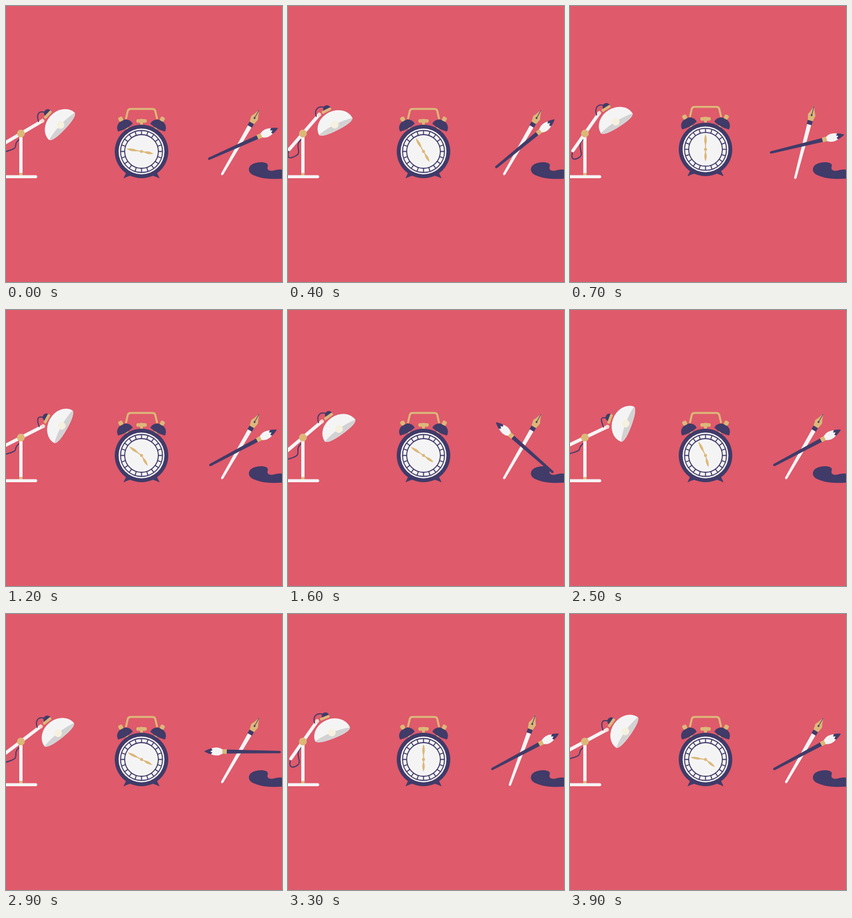
These frames come from a looping animation (500 by 500 pixels, 4 s). An HTML page:

```html
<!DOCTYPE html>
<html lang="en">
<head>
<meta charset="utf-8">
<title>Desk tools</title>
<style>
  html, body { margin: 0; width: 100%; height: 100%; overflow: hidden; background: #df5a6b; }
  svg { display: block; width: 100vw; height: 100vh; }
  .navy { fill: #403b69; }
  .gold { fill: #dbb878; }
  .white { fill: #f5f4f5; }
  .line { fill: none; stroke-linecap: round; stroke-linejoin: round; }
</style>
</head>
<body>
<svg viewBox="0 0 500 500">
  <rect width="500" height="500" fill="#df5a6b"/>

  <g id="lamp">
    <path id="lowCord" class="line" stroke="#403b69" stroke-width="2"/>
    <rect class="white" x="24" y="231" width="6" height="77"/>
    <rect class="gold" x="24" y="302.5" width="6" height="4.5"/>
    <rect class="white" x="-10" y="306.5" width="66.5" height="5.5" rx="2.75"/>
    <path id="arm" class="line" stroke="#f5f4f5" stroke-width="6"/>
    <circle class="gold" cx="27" cy="231" r="7"/>
    <path id="topCord" class="line" stroke="#403b69" stroke-width="2"/>
    <!-- x runs along the rim, y points out of the shade -->
    <g id="head">
      <path class="navy" d="M10 -2C10 -12 24 -12 24 -2Z"/>
      <rect class="gold" x="6" y="-3" width="18" height="5" rx="1.5"/>
      <path class="white" d="M-17 32.5A34 28 0 0 1 51 32.5Q48 40 17 40Q-14 40 -17 32.5Z"/>
      <path fill="#d3d2d3" d="M-17 32.5Q17 25 51 32.5Q48 40 17 40Q-14 40 -17 32.5Z"/>
      <circle cx="17" cy="29" r="7" fill="#f5f1df"/>
      <circle r="3.5" fill="#f7ddd2"/>
    </g>
  </g>

  <g id="clock">
    <path class="line" stroke="#dbb878" stroke-width="3.6" d="M-28 -60L-25 -73Q-24 -77 -20 -77H20Q24 -77 25 -73L28 -60"/>
    <g id="hammer">
      <rect class="gold" x="-2.5" y="-4" width="5" height="12"/>
      <rect class="gold" x="-9.5" y="-3.5" width="19" height="6.5" rx="3"/>
    </g>
    <g id="sides"></g>
    <circle class="navy" r="48.5"/>
    <circle class="white" r="41.5"/>
    <g fill="none" stroke="#403b69" stroke-width="1.8">
      <circle r="38"/>
      <circle r="30.5"/>
      <path id="ticks"/>
    </g>
    <path id="hour" class="gold" d="M-.8 0L-1 -6Q-4 -13 0 -22Q4 -13 1 -6L.8 0Z"/>
    <path id="minute" class="gold" d="M-.8 0L-1 -9Q-4 -18 0 -28Q4 -18 1 -9L.8 0Z"/>
    <circle class="gold" r="2.7"/>
  </g>

  <path class="navy" d="M440 296C440 288 450 283 462 283C471 283 476 286 474 291C472 297 478 300 485 298C491 296 498 296 508 297V312C490 314 469 314 455 309C445 306 440 302 440 296Z"/>

  <g id="pen">
    <path class="white" d="M-3.8 -35H3.8L2.2 67Q0 71 -2.2 67Z"/>
    <rect class="navy" x="-4.6" y="-41" width="9.2" height="8"/>
    <path class="gold" d="M0 -69Q3 -58 7 -51L4.6 -40.5H-4.6L-7 -51Q-3 -58 0 -69Z"/>
    <path class="line" stroke="#403b69" stroke-width="1.2" d="M0 -67V-51"/>
    <circle class="navy" cy="-50.5" r="1.7"/>
  </g>

  <g id="brush">
    <path class="navy" d="M-3.6 -30H3.6L2.2 67Q0 71 -2.2 67Z"/>
    <rect class="gold" x="-4.2" y="-38" width="8.4" height="9"/>
    <path class="navy" d="M0 -70Q5 -62 6 -54H-6Q-5 -62 0 -70Z"/>
    <path class="white" d="M-5 -58L-2 -55L0 -59L2.5 -55L5.5 -57Q10 -46 4 -37H-4Q-10 -46 -5 -58Z"/>
  </g>
</svg>
<script>
const LOOP = 4000, CYCLE = LOOP / 3, STEP = 100;
const $ = id => document.getElementById(id);
const set = (id, name, value) => $(id).setAttribute(name, value);
const clamp = x => Math.min(1, Math.max(0, x));
const sine = x => (1 - Math.cos(Math.PI * clamp(x))) / 2;
const quad = x => x < .5 ? 2 * x * x : 1 - 2 * (1 - x) ** 2;

// Smooth curve through [phase, value] pairs, without overshoot.
function track(keys) {
  const n = keys.length - 1;
  const rise = i => (keys[i + 1][1] - keys[i][1]) / (keys[i + 1][0] - keys[i][0]);
  const slope = keys.map((_, i) => {
    const a = rise(i ? i - 1 : n - 1), b = rise(i < n ? i : 0);
    return a * b > 0 ? 2 * a * b / (a + b) : 0;
  });
  return p => {
    let i = 0;
    while (i < n - 1 && p >= keys[i + 1][0]) i++;
    const [x, y] = keys[i], [x2, y2] = keys[i + 1];
    const w = x2 - x, s = (p - x) / w, r = 1 - s;
    return y * r * r * (1 + 2 * s) + y2 * s * s * (3 - 2 * s)
      + w * s * r * (slope[i] * r - slope[i + 1] * s);
  };
}

const armAngle = track([[0, 30.5], [.08, 30.5], [.25, 45], [.4, 55], [.7, 55], [.8, 43],
  [.875, 25.5], [.9, 27], [.925, 28.2], [1, 30.5]]);
const headAngle = track([[0, 46.7], [.08, 45.5], [.25, 31], [.42, 20], [.475, 21.6], [.5, 25],
  [.525, 32], [.6, 74], [.65, 91], [.7, 88], [.8, 84], [.875, 69.7], [.9, 61], [.925, 54.7], [1, 46.7]]);
const minuteAngle = track([[0, -80], [.08, -80], [.26, -40], [.45, 0], [.84, 0], [.875, -27],
  [.9, -54], [.925, -82], [.95, -90], [1, -80]]);
const hourAngle = track([[0, 101], [.08, 101], [.26, 140], [.45, 180], [.84, 180], [.875, 166],
  [.9, 149], [.925, 129], [.96, 109], [1, 101]]);

$('ticks').setAttribute('d', Array.from({ length: 20 }, (_, i) => {
  const a = i * Math.PI / 10, c = Math.cos(a), s = Math.sin(a);
  return `M${30.5 * c} ${30.5 * s}L${38 * c} ${38 * s}`;
}).join(''));

$('sides').innerHTML = [1, -1].map(k => `<g transform="scale(${k} 1)">
  <path class="navy" d="M-27 37L-32.5 48Q-31 49 -29 47L-18 43Z"/>
  <path class="line" stroke="#dbb878" stroke-width="5" d="M-38 -60L-24 -39"/>
  <path class="navy" transform="translate(-31.5 -47.5) rotate(-28)" d="M-15 5C-15 -14 15 -14 15 5Q0 9 -15 5Z"/>
  <rect class="gold" x="-4" y="-3.5" width="8" height="8" rx="2.5" transform="translate(-38 -59) rotate(-28)"/>
</g>`).join('');

function drawLamp(p) {
  const a = armAngle(p) * Math.PI / 180, h = headAngle(p), r = h * Math.PI / 180;
  const c = Math.cos(a), s = Math.sin(a);
  const jx = 27 + 45.2 * c, jy = 231 - 45.2 * s;
  const tx = 27 - 38 * c, ty = 231 + 38 * s;
  set('arm', 'd', `M${tx} ${ty}L${jx} ${jy}`);
  set('head', 'transform', `translate(${jx} ${jy}) rotate(${-h})`);

  const low = ty + 15, mid = tx + 7;
  set('lowCord', 'd', `M25 241C10 252 26 ${low - 10} ${mid + 6} ${low - 4}S${tx - 6} ${low + 4} ${tx} ${ty}`);

  const cx = jx + 14 * Math.cos(r) - 8 * Math.sin(r);
  const cy = jy - 14 * Math.sin(r) - 8 * Math.cos(r);
  const sx = jx - 8 * c, sy = jy + 8 * s - 3;
  set('topCord', 'd', `M${sx} ${sy}C${sx - 4} ${sy - 11} ${cx - 12} ${cy - 3} ${cx} ${cy}`);
}

function drawClock(p) {
  const ringing = p > .475 && p < .825;
  const tilt = ringing ? -4 * Math.sin((p - .475) * 20 * Math.PI) : 0;
  const lift = 3.8 * sine((p - .475) / .045) * (1 - sine((p - .8) / .06));
  set('clock', 'transform', `translate(${245.5 - tilt * .3} ${263.5 - lift}) rotate(${tilt})`);
  set('hammer', 'transform', `translate(${-2 * tilt} -55) rotate(${2 * tilt})`);
  set('minute', 'transform', `rotate(${minuteAngle(p)})`);
  set('hour', 'transform', `rotate(${hourAngle(p)})`);
}

function drawTools(p) {
  const spin = 360 * quad(clamp(((p + .028) % .5) / .375));
  const swing = 23 * sine((p - .33) / .32) * (1 - sine((p - .66) / .19));
  set('brush', 'transform', `translate(429 249.5) rotate(${62 + spin})`);
  set('pen', 'transform', `translate(425 246.7) rotate(${30 - swing})`);
}

function draw() {
  const t = Math.floor(performance.now() / STEP) * STEP % LOOP;
  const p = t % CYCLE / CYCLE;
  drawLamp(p);
  drawClock(p);
  drawTools(p);
  requestAnimationFrame(draw);
}
draw();
</script>
</body>
</html>
```
